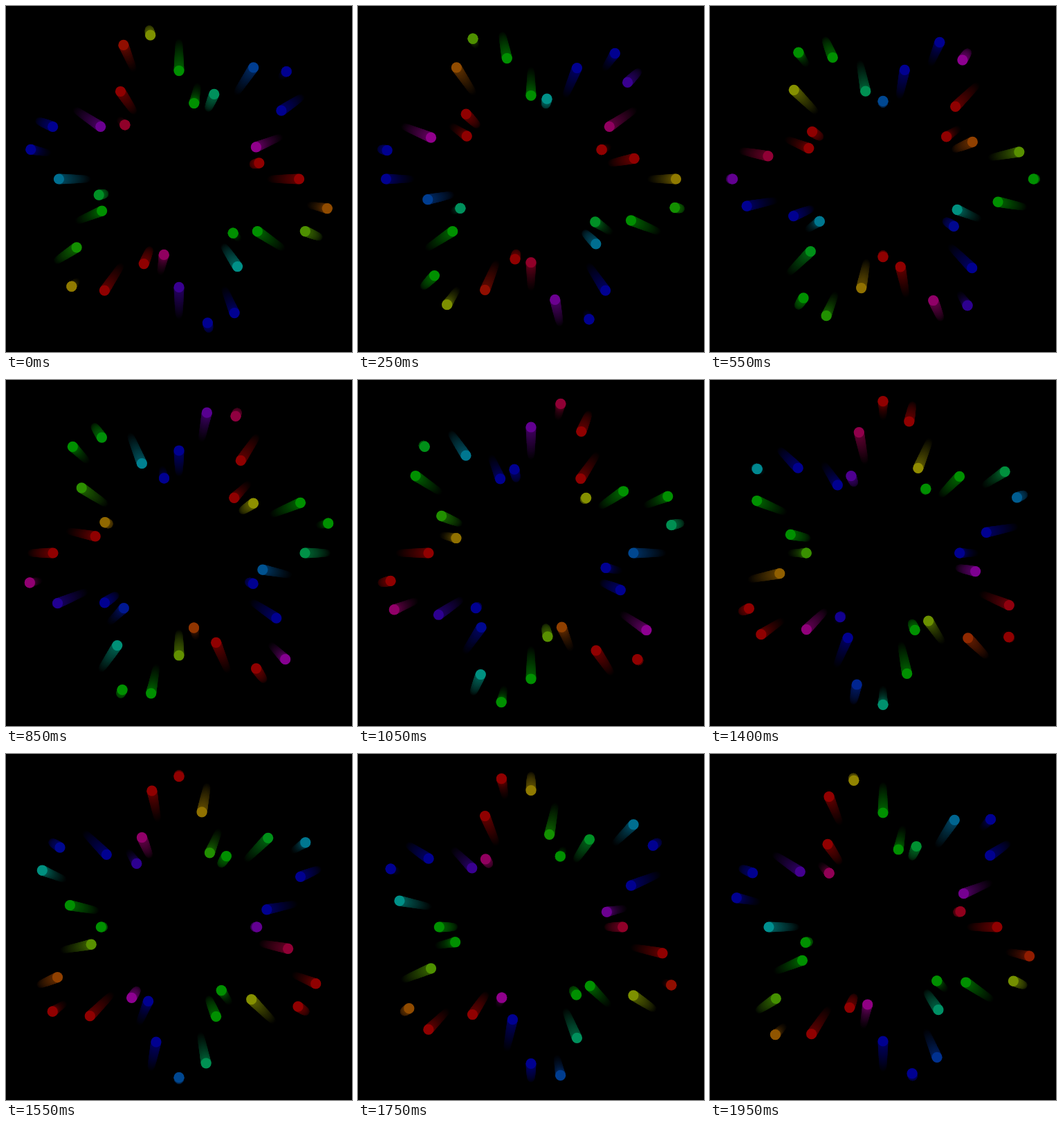
An HTML page with a canvas that plays this animation: 500 by 500 pixels, repeating every 2 s.

```html
<!DOCTYPE html>
<html lang="en">
<head>
<meta charset="utf-8">
<title>Pulsing ring of dots</title>
<style>
  html, body { margin: 0; width: 100%; height: 100%; overflow: hidden; background: #000; }
  canvas { display: block; width: 500px; height: 500px; }
</style>
</head>
<body>
<canvas id="stage" width="500" height="500"></canvas>
<script>
const ctx = document.getElementById('stage').getContext('2d');
const TAU = Math.PI * 2;
const DEG = Math.PI / 180;
const LOOP = 2000, STEP = 50;
const DOTS = 32, WAVES = 6, HUE_TURNS = 3;
const MID = 165, SWING = 55, DOT = 7.6;
const GHOSTS = 28, TRAIL = 47 * DEG;
const LEVEL = 144;

// Cosine channels capped at half height give wide plateaus of pure colour.
function channel(hue, centre) {
  const wave = Math.cos(hue - centre);
  return Math.min(1, Math.max(0, wave) * 2) ** 0.8;
}

function shade(hue, light) {
  const rgb = [0, 120, 240].map(c => Math.round(LEVEL * light * channel(hue, c * DEG)));
  return `rgb(${rgb.join(',')})`;
}

function disc(angle, phase, size, color) {
  const r = MID + SWING * Math.sin(phase);
  ctx.fillStyle = color;
  ctx.beginPath();
  ctx.arc(250 + r * Math.cos(angle), 250 + r * Math.sin(angle), size, 0, TAU);
  ctx.fill();
}

function drawDot(index, clock) {
  const angle = index / DOTS * TAU;
  const phase = clock + WAVES * angle;
  const hue = clock + HUE_TURNS * angle;
  for (let i = GHOSTS; i > 0; i--) {
    const age = i / GHOSTS;
    disc(angle, phase - TRAIL * age, DOT - 2.4 * age, shade(hue, 0.62 * (1 - age)));
  }
  disc(angle, phase, DOT, shade(hue, 1));
}

function render(ms) {
  const tick = Math.floor((ms % LOOP) / STEP);
  const clock = (tick + 1) * STEP / LOOP * TAU;
  ctx.fillStyle = '#000';
  ctx.fillRect(0, 0, 500, 500);
  for (let i = 0; i < DOTS; i++) drawDot(i, clock);
}

const start = performance.now();
function loop() {
  render(performance.now() - start);
  requestAnimationFrame(loop);
}
loop();
</script>
</body>
</html>
```
